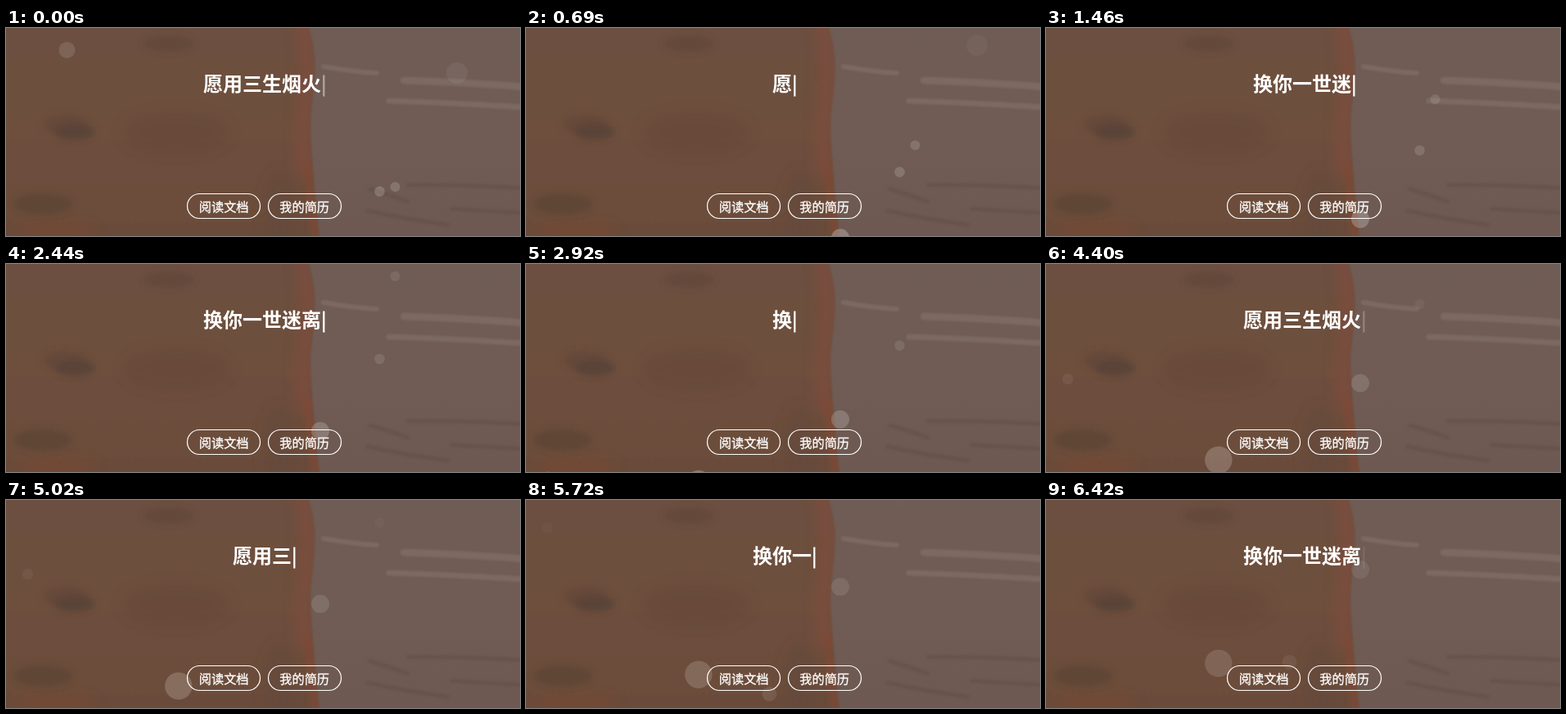
These frames come from a looping animation (628x254 px, 6490 ms). An HTML page:

```html
<!DOCTYPE html>
<html lang="zh-CN">
<head>
<meta charset="utf-8">
<title>Typing banner</title>
<style>
  html, body { margin: 0; width: 100%; height: 100%; overflow: hidden; background: #6b4d3d; }
  svg { position: absolute; left: 0; top: 0; display: block; }
  text { fill: #fff; font-family: "Noto Sans CJK SC", "Noto Sans CJK", "Noto Sans", sans-serif; }
  #line { font-size: 24px; font-weight: 700; }
  .label { font-size: 15.2px; stroke: #fff; stroke-width: .3px; }
  .pill { fill: none; stroke: #fff; stroke-width: 1.2px; }
</style>
</head>
<body>
<svg width="628" height="254" viewBox="0 0 628 254">
  <defs>
    <filter id="soft" x="-50%" y="-80%" width="200%" height="260%"><feGaussianBlur stdDeviation="7"/></filter>
    <filter id="mild" x="-50%" y="-80%" width="200%" height="260%"><feGaussianBlur stdDeviation="3.5"/></filter>
    <filter id="edge" x="-10%" y="-10%" width="120%" height="120%"><feGaussianBlur stdDeviation="1.2"/></filter>
    <linearGradient id="wall" x2="0" y2="1">
      <stop offset="0" stop-color="#6f5c55"/>
      <stop offset=".55" stop-color="#705c55"/>
      <stop offset="1" stop-color="#6d5951"/>
    </linearGradient>
    <linearGradient id="clay" x2="0" y2="1">
      <stop offset="0" stop-color="#6c4f40"/>
      <stop offset=".5" stop-color="#6e4f3d"/>
      <stop offset="1" stop-color="#6b4c3a"/>
    </linearGradient>
  </defs>

  <rect width="628" height="254" fill="url(#wall)"/>
  <path id="block" filter="url(#edge)" fill="url(#clay)" d="M-20-20H366C370 5 380 25 377 60C376 90 370 105 373 140C375 180 379 215 385 275H-20Z"/>
  <clipPath id="inside"><use href="#block"/></clipPath>

  <g clip-path="url(#inside)">
    <g filter="url(#soft)">
      <path fill="none" stroke="#7b4d3d" stroke-width="17" d="M360-10C370 25 368 70 364 100C360 125 361 150 366 180"/>
      <ellipse cx="335" cy="225" rx="20" ry="50" fill="#664b3d" opacity=".7"/>
      <ellipse cx="208" cy="128" rx="66" ry="26" fill="#654937" opacity=".5"/>
      <ellipse cx="60" cy="248" rx="50" ry="12" fill="#754b34" opacity=".7"/>
    </g>
    <g filter="url(#mild)">
      <ellipse cx="199" cy="19" rx="31" ry="10" fill="#62473a" opacity=".75"/>
      <ellipse cx="73" cy="118" rx="28" ry="12" fill="#614737" opacity=".6"/>
      <ellipse cx="84" cy="127" rx="25" ry="10" fill="#574137" opacity=".8"/>
      <ellipse cx="45" cy="215" rx="36" ry="13" fill="#5d4436" opacity=".8"/>
      <path fill="none" stroke="#7f4a36" stroke-width="7" d="M367 165C371 195 374 225 380 265"/>
    </g>
  </g>
  <g fill="none" stroke-linecap="round" filter="url(#edge)">
    <g stroke="#7b6962">
      <path stroke-width="6" d="M388 47Q420 53 453 55"/>
      <path stroke-width="9" d="M486 64Q555 66 635 72"/>
      <path stroke-width="7" d="M468 89Q540 91 635 97"/>
    </g>
    <g stroke="#65514a" stroke-width="5" opacity=".6">
      <path d="M445 197Q470 204 490 212"/>
      <path d="M492 192Q560 191 635 196"/>
      <path d="M442 223Q485 233 540 240"/>
      <path d="M545 221L635 226"/>
    </g>
  </g>

  <g id="bubbles" fill="#fff"></g>

  <rect class="pill" x="221.5" y="202.5" width="89" height="30" rx="15"/>
  <rect class="pill" x="320.5" y="202.5" width="89" height="30" rx="15"/>
  <text class="label" x="235.8" y="224">阅读文档</text>
  <text class="label" x="334.3" y="224">我的简历</text>

  <text id="line" y="77.4"></text>
  <rect id="cursor" y="57.5" width="2.2" height="26" fill="#fff"/>
</svg>
<script>
const LOOP = 6490;
const PHRASES = ["愿用三生烟火", "换你一世迷离"];
const LENGTH = 6, SIZE = 24, CENTER = 313;

// One phrase is typed, held and deleted per pass (ms)
const PASS = 2230, OFFSET = 1220;
const TYPE = 110, ERASE = 70, ERASE_AT = 1620;
const BLINK_AT = 630, BLINK = 800;

// Bubbles rise steadily and fade; y and alpha are given at time 0
const FADE = 0.00003;
const BUBBLES = [
  { x: 74.5, r: 10, y: 27, speed: .075, alpha: .12 },
  { x: 551, r: 13, y: 55, speed: .049, alpha: .06 },
  { x: 475.5, r: 6, y: 194, speed: .0733, alpha: .16 },
  { x: 456.5, r: 6.3, y: 199.5, speed: .0342, alpha: .18 },
  { x: 384, r: 11, y: 277, speed: .0299, alpha: .27 },
  { x: 26.5, r: 6.7, y: 495.6, speed: .0807, alpha: .2 },
  { x: 210.8, r: 16.7, y: 326.5, speed: .0198, alpha: .33 },
  { x: 297.5, r: 9, y: 555.6, speed: .0557, alpha: .26 }
];

const byId = id => document.getElementById(id);
const set = (node, attrs) => {
  for (const key in attrs) node.setAttribute(key, attrs[key]);
};
const line = byId("line"), cursor = byId("cursor");

const circles = BUBBLES.map(({ x, r }) => {
  const circle = document.createElementNS("http://www.w3.org/2000/svg", "circle");
  set(circle, { cx: x, r });
  return byId("bubbles").appendChild(circle);
});

function drawBubbles(t) {
  BUBBLES.forEach(({ y, speed, alpha }, i) => set(circles[i], {
    cy: y - speed * t,
    opacity: Math.max(0, alpha - FADE * t)
  }));
}

function drawLine(t) {
  const pass = Math.floor((t + OFFSET) / PASS);
  const p = (t + OFFSET) % PASS;
  const typed = 1 + Math.floor(p / TYPE);
  const kept = LENGTH - 1 - Math.floor((p - ERASE_AT) / ERASE);
  const count = Math.max(0, Math.min(LENGTH, typed, kept));
  const left = CENTER - count * SIZE / 2;
  const idle = p >= BLINK_AT && p < ERASE_AT;
  const glow = .5 + .5 * Math.cos(2 * Math.PI * (p - BLINK_AT) / BLINK);

  line.textContent = PHRASES[pass % 2].slice(0, count);
  set(line, { x: left });
  set(cursor, { x: left + count * SIZE + 2.2, opacity: idle ? glow : 1 });
}

const start = performance.now();
function frame() {
  const t = (performance.now() - start) % LOOP;
  drawBubbles(t);
  drawLine(t);
  requestAnimationFrame(frame);
}
frame();
</script>
</body>
</html>
```
